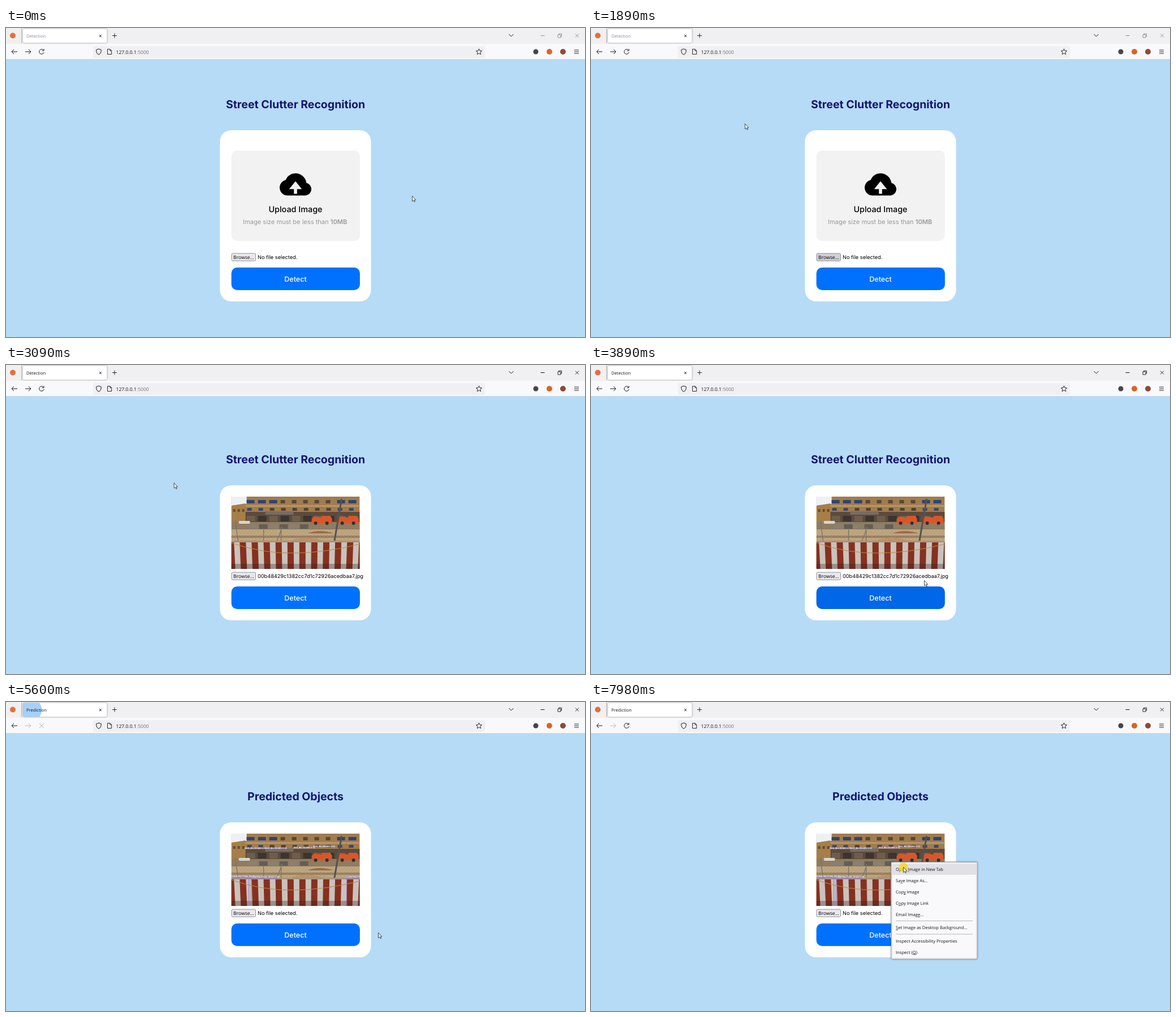
An HTML page with a canvas for the animation above (8000 ms loop, 1024 px wide and 547 px high).

```html
<!DOCTYPE html>
<html lang="en">
<head>
<meta charset="utf-8">
<title>Detection</title>
<style>
html, body { margin: 0; height: 100%; overflow: hidden; }
canvas { display: block; width: 100vw; height: 100vh; }
</style>
</head>
<body>
<canvas id="stage"></canvas>
<script>
const W = 1024, H = 547, LOOP = 8000;
const UI = '"Open Sans", "Noto Sans", "DejaVu Sans", sans-serif';
const PAGE = 'Inter, "Open Sans", sans-serif';
const FILE = '00b48429c1382cc7d1c72926acedbaa7';
const INK = '#15141a', GREY = '#8a8a92';
const canvas = document.getElementById('stage');
const ctx = canvas.getContext('2d');
const dpr = window.devicePixelRatio || 1;
canvas.width = W * dpr;
canvas.height = H * dpr;

// Drawing helpers
function text(s, x, y, { size = 7.6, color = INK, font = UI, weight = 400, align = 'left' } = {}) {
  ctx.font = `${weight} ${size}px ${font}`;
  ctx.fillStyle = color;
  ctx.textAlign = align;
  ctx.fillText(s, x, y + size * 0.36);
  return ctx.measureText(s).width;
}
function box(x, y, w, h, fill, stroke, r = 0, lineWidth = 1) {
  ctx.beginPath();
  ctx.roundRect(x, y, w, h, r);
  if (fill) { ctx.fillStyle = fill; ctx.fill(); }
  if (stroke) { ctx.strokeStyle = stroke; ctx.lineWidth = lineWidth; ctx.stroke(); }
}
function dot(x, y, r, fill) {
  ctx.beginPath();
  ctx.arc(x, y, r, 0, 7);
  ctx.fillStyle = fill;
  ctx.fill();
}
function path(d, x, y, stroke, fill, lineWidth = 1) {
  const shape = new Path2D(d);
  ctx.save();
  ctx.translate(x, y);
  if (fill) { ctx.fillStyle = fill; ctx.fill(shape); }
  if (stroke) { ctx.strokeStyle = stroke; ctx.lineWidth = lineWidth; ctx.stroke(shape); }
  ctx.restore();
}
function shadowed(blur, color, draw) {
  ctx.save();
  ctx.shadowBlur = blur * dpr;
  ctx.shadowColor = color;
  draw();
  ctx.restore();
}
function clipped(x, y, w, h, draw) {
  ctx.save();
  ctx.beginPath();
  ctx.rect(x, y, w, h);
  ctx.clip();
  draw();
  ctx.restore();
}
const during = (t, from, to) => t >= from && t < to;
const progress = (t, from, to) => Math.min(1, Math.max(0, (t - from) / (to - from)));

const CROSS = 'M-3-3L3 3M3-3L-3 3';
const DOWN = 'M-3-1.5L0 1.5L3-1.5';
const RIGHT = 'M-1.3-2.3L1.2 0L-1.3 2.3';

// Pointer track: time, x, y
const TRACK = [
  [380, 718, 297], [760, 570, 348], [1150, 414, 403], [1290, 414, 403], [1690, 347, 197],
  [2030, 220, 150], [2400, 176, 139], [2960, 176, 139], [3420, 600, 383], [3700, 600, 383],
  [3890, 589, 381], [4130, 575, 398], [4400, 561, 412], [4990, 561, 412], [5320, 652, 410],
  [5450, 658, 408], [5750, 658, 408], [6130, 599, 336], [6370, 529, 281], [7500, 529, 281], [7950, 552, 292]
];
const CLICKS = [[1180, 1300], [2540, 2610], [2680, 2750], [4570, 4710], [7100, 7240], [7960, 8000]];

function pointerAt(t) {
  const i = TRACK.findIndex(k => k[0] > t);
  if (i === 0) return TRACK[0].slice(1);
  if (i < 0) return TRACK.at(-1).slice(1);
  const [t0, x0, y0] = TRACK[i - 1], [t1, x1, y1] = TRACK[i];
  const p = progress(t, t0, t1);
  return [x0 + (x1 - x0) * p, y0 + (y1 - y0) * p];
}

function drawPointer(t) {
  const [x, y] = pointerAt(t);
  if (CLICKS.some(([a, b]) => during(t, a, b))) dot(x + 0.5, y + 0.8, 8.3, 'rgba(250,214,40,.85)');
  if (during(t, 4080, 5060))
    path('M0 1q1-2 2 0v4l4 1q1.6.5 1.2 2L6 12H1L-2.5 8q0-1.5 1.5-.7L0 8z', x, y, '#111', '#fff', 0.8);
  else
    path('M0 0V9.4L2.2 7.5L3.7 10.6L5 10L3.7 7H6.3Z', x + 0.5, y + 0.3, '#222', '#fff', 0.8);
}

function drawBrowser(t) {
  const predicted = t >= 5460;
  const loading = during(t, 4640, 5460);
  const active = during(t, 70, 1420) || t >= 2960;
  const tone = active ? INK : GREY;

  box(0, 0, W, 28, '#f0f0f2');
  box(0, 28, W, 27, '#f9f9fb');
  dot(12, 13.5, 5, '#e0703c');
  path('M0 0V27', 27.5, 0, '#b5b5bd');
  shadowed(3, 'rgba(0,0,0,.45)', () => box(30, 1.5, 148.5, 24.5, '#fff', null, 2.5));
  const burst = progress(t, 5510, 5930);
  if (burst > 0 && burst < 1) clipped(30, 1.5, 148, 24.5, () => {
    ctx.globalAlpha = 1 - burst * 0.5;
    dot(44, 14, 5 + burst * 66, '#9bcbfb');
  });
  if (loading) dot(40.5 + 4.5 * Math.sin((t - 4870) / 95), 14, 1.2, INK);
  text(predicted ? 'Prediction' : 'Detection', loading ? 50 : 36, 14, { color: tone });
  path('M-2-2L2 2M2-2L-2 2', 167, 14, INK, null, 0.9);
  path('M-4 0H4M0-4V4', 192, 13.5, INK, null, 0.9);
  path('M-4-2L0 2L4-2', 893.5, 13, INK);
  path('M-3.5 0H3.5', 949, 13.5, tone);
  path('M-3-1H2V4H-3ZM-1.3-1V-2.8H3.6V2H2', 979, 13, tone, null, 0.9);
  path(CROSS, 1010, 13.5, tone, null, 0.9);

  path('M5 0H-4.5M-1-4L-5 0L-1 4', 15, 42, INK);
  path('M-5 0H4.5M1-4L5 0L1 4', 39, 42, predicted ? '#b8b8be' : INK);
  if (during(t, 4640, 6230)) path('M-4-4L4 4M4-4L-4 4', 63, 42, predicted ? '#b0b0b6' : INK);
  else path('M4.2 1A4.3 4.3 0 1 1 3-3.2M4-5V-1.8H.8', 63, 42, INK);
  box(154, 32, 693, 21, '#f0f0f4', null, 2);
  path('M0-5L4.3-3.4C4.5 1 3 4 0 5.2C-3 4-4.5 1-4.3-3.4Z', 164, 42, INK);
  path('M-3.5-4.5H1L3.7-1.8V4.5H-3.5ZM1-4.5V-1.8H3.7', 183, 42, INK, null, 0.9);
  const hostWidth = text('127.0.0.1', 194.5, 42.5, { size: 8.6 });
  text(':5000', 194.5 + hostWidth, 42.5, { size: 8.6, color: '#75757d' });
  ctx.beginPath();
  for (let i = 0; i < 10; i++) {
    const a = i * Math.PI / 5 - Math.PI / 2, r = i % 2 ? 2.5 : 5.4;
    ctx.lineTo(836.5 + r * Math.cos(a), 42.3 + r * Math.sin(a));
  }
  ctx.closePath();
  ctx.strokeStyle = INK;
  ctx.lineWidth = 0.9;
  ctx.stroke();
  dot(937, 42, 4.5, '#45444c');
  dot(961, 42, 5, '#d9642b');
  dot(985, 42, 5, '#8d4b38');
  path('M-4-3H4M-4 0H4M-4 3H4', 1009, 42, INK, null, 0.9);
}

// Street scene in a 227 by 128 space
function drawPhoto(x, y, scale, labelled) {
  ctx.save();
  ctx.translate(x, y);
  ctx.scale(scale, scale);
  clipped(0, 0, 227, 128, () => {
    box(0, 0, 227, 128, '#a07c50');
    path('M0 0H27V13L0 16Z', 0, 0, null, '#edf0f4');
    path('M0 16L25 12V46H0Z', 0, 0, null, '#a67f48');
    box(25, 15, 202, 3, '#bb9564');
    box(25, 27, 202, 18, '#5b4b3c');
    for (let i = 0; i < 10; i++) {
      const blue = i < 3 || i > 7;
      box(27 + i * 20, 6, blue ? 14 : 8, 6, blue ? '#2f4470' : '#594734');
      box(28 + i * 20, 20, 8, 5, i < 2 || i > 7 ? '#37486a' : '#514030');
      box(27 + i * 20, 34, 15, 10, i % 2 ? '#3c342e' : '#6e5d4b');
    }
    for (let i = 0; i < 3; i++) box(3 + i * 8, 22, 4, 5, '#664d30');
    box(60, 26, 50, 6, '#756d64');
    box(0, 45, 227, 14, '#8f7c62');
    box(13, 43, 20, 5, '#d8d5ce', null, 2);
    for (const left of [142, 189]) {
      path('M0 6L4 1L18 3V0H33L36 5V13H0Z', left, 34, null, '#d9562b');
      dot(left + 7, 47, 3, '#30302f');
      dot(left + 27, 47, 3, '#30302f');
    }
    for (let i = 0; i < 6; i++) box(31 + i * 18, 49, 15, 8, i % 2 ? '#625e55' : '#89806f');
    box(0, 58, 227, 22, '#c0a780');
    box(0, 69, 227, 4, '#9a8263');
    path('M105 78Q132 67 162 78Z', 0, 0, null, '#bd956c');
    path('M135 65Q155 57 181 65Z', 0, 0, null, '#a06a48');
    for (let i = -20; i < 227; i += 6)
      path('M0 80L20 56M0 56L20 80', i, 0, 'rgba(105,95,80,.28)', null, 0.5);
    path('M195 4L182 80', 0, 0, '#555350', null, 3);
    path('M7 42L12 80M90 54L80 80M88 54V80M57 58V80', 0, 0, '#77736a', null, 1.3);
    box(0, 80, 227, 48, '#c9c2bc');
    for (let i = 0; i < 12; i++) {
      const lean = (i - 6) * 0.4;
      path(`M0 0H11L${11 - lean} 47H${-lean}Z`, -4 + i * 20.7 + lean, 81, null, '#87301f');
    }
    box(0, 78, 227, 3, '#a8937c');
    box(0, 119, 227, 9, 'rgba(45,28,24,.3)');
    path('M0 82Q55 101 112 100T227 84', 0, 0, '#b88c42', null, 1);
    if (labelled) {
      const label = (s, lx, ly, w) => {
        box(lx, ly - 2, w, 4, 'rgba(116,104,165,.55)');
        text(s, lx, ly, { size: 3.6, color: '#fff', font: PAGE, weight: 700 });
      };
      label('BAD_BILLBOARD 0.51', 24, 26, 38);
      label('BAD_BILLBOARD 0.53', 60, 26, 38);
      label('BAD_BILLBOARD 0.54', 110, 24.5, 36);
      label('BAD_BILLBOARD 0.62', 145, 23, 37);
      label('CONSTRUCTION_ROAD', 0, 76, 38);
      label('CONSTRUCTION_ROAD 0.65', 34, 77, 48);
      label('CONSTRUCTION', 203, 77, 24);
      path('M0 79H35V128M31 128V79H82M204 128V79H227', 0, 0, '#9877d2', null, 0.9);
    }
  });
  ctx.restore();
}

function mixButton(p) {
  return `rgb(0,${Math.round(113 - 21 * p)},${Math.round(255 - 46 * p)})`;
}

function drawPage(t) {
  const preview = t >= 3030, predicted = t >= 5460;
  const shift = preview ? 32 : 0;
  const middle = { font: PAGE, align: 'center' };

  box(0, 55, W, H - 55, '#b5dbf6');
  text(predicted ? 'Predicted Objects' : 'Street Clutter Recognition', 512, 135 + shift,
    { ...middle, size: 19.5, weight: 700, color: '#14146e' });
  box(378.3, 181 + shift, 267.3, 303 - 2 * shift, '#fff', null, 20);

  if (preview) {
    drawPhoto(398.6, 233, 1, predicted);
  } else {
    box(398.6, 217, 227.3, 160, '#f2f2f2', null, 10);
    ctx.save();
    ctx.translate(478.4, 246);
    ctx.scale(2.8, 2.8);
    path('M18.9 10.1C18.5 6.7 15.6 4 12 4C9.2 4 6.9 5.6 5.8 8.2C3.6 8.8 2 10.8 2 13C2 15.8 4.2 18 7 18H18C20.2 18 22 16.2 22 14C22 12.2 20.7 10.6 18.9 10.1ZM13 14V17H11V14H8L12 9L16 14Z', 0, 0, null, '#000');
    ctx.restore();
    text('Upload Image', 512, 321, { ...middle, size: 14.4, weight: 500, color: '#000' });
    const note = { font: PAGE, size: 11.1, color: '#999' };
    const noteWidth = text('Image size must be less than ', 419, 343, note);
    text('10MB', 419 + noteWidth, 343, { ...note, weight: 600 });
  }

  const pressed = during(t, 1180, 1280), hovered = during(t, 1080, 2960);
  box(399, 399 - shift, 42.5, 13.3, pressed ? '#b1b1b9' : hovered ? '#d0d0d7' : '#e9e9ed', '#8f8f9d', 2);
  text('Browse...', 420.3, 406 - shift, { size: 8.6, align: 'center', color: '#000' });
  text(preview && !predicted ? FILE + '.jpg' : 'No file selected.', 445, 406 - shift,
    { size: 9.2, font: PAGE, color: '#000' });
  const hover = progress(t, 3750, 4050) - progress(t, 5080, 5380);
  box(398.6, 424 - shift, 227.3, 40, mixButton(hover), null, 10);
  text('Detect', 512, 444 - shift, { ...middle, size: 12.5, weight: 500, color: '#fff' });

  if (during(t, 4700, 5530)) {
    box(-1, 536.5, 36.5, 12, '#f9f9fb', '#c6c6cc', 1);
    text('127.0.0.1', 2, 543, { color: '#444' });
  }
}

function folder(x, y) {
  box(x - 3, y - 4, 6, 8, '#f6ca55');
  box(x - 3, y - 3, 4, 7, '#ffe08a');
}

function drawDialog(t) {
  if (!during(t, 2060, 2890)) return;
  const selected = t >= 2540, hovered = t >= 2330;
  ctx.save();
  ctx.globalAlpha = t < 2150 ? 0.6 : 1;
  shadowed(t < 2150 ? 0 : 13, 'rgba(0,0,0,.5)', () => box(3.5, 14.5, 504, 316, '#fff', '#75777a'));
  dot(13.5, 25, 4.8, '#e0703c');
  text('File Upload', 22, 25);
  path(CROSS, 496, 25, INK);

  path('M4 0H-4M-1-3L-4 0L-1 3', 17, 48, '#d0d0d0');
  path('M-4 0H4M1-3L4 0L1 3', 40, 48, '#d0d0d0');
  path('M-1.5-.7L0 .7L1.5-.7', 53, 48, '#c0c0c0');
  path('M0 4V-4M-3-1L0-4L3-1', 67, 48, '#555');
  box(75.5, 38.5, 283, 20, '#fff', '#dadada');
  path('M0 0V20', 336.5, 38.5, '#dadada');
  folder(82, 48);
  for (const x of [94, 133, 178]) path(RIGHT, x, 48, '#555');
  text('This PC', 101, 48);
  text('Desktop', 140, 48);
  text('img', 184, 48);
  path(DOWN, 325, 48, '#555');
  path('M3 1A3.2 3.2 0 1 1 2-2.5M3-4V-1.5H.5', 348, 48, '#555');
  box(365.5, 38.5, 135, 20, '#fff', '#dadada');
  path('M-1 1L-4 4M4-1.5A2.5 2.5 0 1 1-1-1.5A2.5 2.5 0 1 1 4-1.5', 379, 48, '#777', null, 0.8);
  text('Search img', 393, 48, { color: '#6d6d6d' });

  box(4, 62, 503, 21, '#f5f6f7');
  text('Organize', 15, 72.5, { color: '#1e395b' });
  text('New folder', 74, 72.5, { color: '#1e395b' });
  path('M-2-1H2L0 1.3Z', 53, 72.5, null, INK);
  path('M-2-1H2L0 1.3Z', 445, 72.5, null, INK);
  box(426, 68.5, 9, 7, '#a9cbe5', '#8096a6', 0, 0.6);
  box(426, 73, 9, 2.5, '#446f91');
  box(462.5, 68.5, 9, 7.5, '#fff', '#327bb8', 0, 0.8);
  box(467.5, 69, 4, 7, '#66b3ea');
  dot(491.5, 72.5, 5.5, '#0068b8');
  text('?', 491.5, 72.5, { color: '#fff', weight: 700, align: 'center' });

  clipped(4, 83, 93, 194, () => {
    box(4, 264, 93, 14, '#d9d9d9');
    const places = ['Desktop', 'Downloads', 'Documents', 'Pictures', 'G:\\',
      'Final_submission', 'PDF_مرتب', 'test', 'street-clutter-m'];
    places.forEach((name, i) => {
      const y = 91 + i * 16;
      if (i === 1) path('M-1.5-4H1.5V0H4L0 4L-4 0H-1.5Z', 30, y, null, '#2785d8');
      else if (i > 4) folder(30, y);
      else box(26, y - 3, 8.5, 6.5, ['#1b8ce3', '', '#a9bdcc', '#8dbbd8', '#737b80'][i], '#54768d', 0, 0.5);
      text(name, 38.5, y);
      if (i < 5) path('M-3 3L-1 1M-2-.5L1.5 2.5M-1 0L1-3L3.5-1L1 1.5', 91, y, '#777', null, 0.9);
    });
    box(22, 237, 8, 6, '#46a7e4', '#617d8d', 0, 0.6);
    text('This PC', 33, 240.5);
    path('M-4-2.5L0-4.5L4-2.5V2.5L0 4.5L-4 2.5Z', 30, 257, null, '#2d9bd3');
    path('M-4-2.5L0-1V4.5L-4 2.5Z', 30, 257, null, '#176c9c');
    text('3D Objects', 38.5, 257);
    box(26, 270, 9, 6.5, '#1b8ce3', '#165c91', 0, 0.5);
    text('Desktop', 38.5, 273);
  });
  box(97, 83, 10, 194, '#f0f0f0');
  box(97, 104, 10, 91, '#cdcdcd');
  path('M-2.5 1.3L0-1.3L2.5 1.3', 102, 89, '#444');
  path('M-2.5-1.3L0 1.3L2.5-1.3', 102, 271, '#444');

  if (selected || hovered)
    box(120.5, 87.5, 69, 99, selected ? '#cce8ff' : '#e5f3ff', selected ? '#99d1ff' : null);
  shadowed(2, 'rgba(0,0,0,.6)', () => box(125, 116.5, 58, 33, '#a07c50'));
  drawPhoto(125, 116.5, 58 / 227, false);
  [FILE.slice(0, 14), FILE.slice(14, 28), FILE.slice(28)].forEach((s, i) =>
    text(s, 155, 158.5 + i * 10.8, { align: 'center' }));

  box(4, 277, 503, 53, '#f0f0f0');
  text('File name:', 119, 293, { align: 'right' });
  box(122.5, 286.5, 240, 14, '#fff', '#0078d7');
  if (selected) text(FILE, 124, 293);
  path(DOWN, 357, 293, '#555', null, 0.8);
  box(371.5, 286.5, 124, 14, '#e1e1e1', '#adadad');
  text('All Files', 373, 293);
  path(DOWN, 490, 293, '#555', null, 0.8);
  box(372, 306, 56.5, 15, '#e1e1e1', '#0078d7', 0, 1.4);
  text('Open', 400, 313.5, { align: 'center' });
  box(438.5, 305.5, 57, 16, '#e1e1e1', '#adadad');
  text('Cancel', 467, 313.5, { align: 'center' });
  path('M0 6L6 0M3 6L6 3', 500, 323, '#b5b5b5', null, 0.9);
  ctx.restore();
}

// Menu rows: centre line, caption, index of the underlined letter
const MENU = [
  [296.5, 'Open Image in New Tab', 5], [316.5, 'Save Image As...', 2], [336.5, 'Copy Image', 3],
  [356.5, 'Copy Image Link', 1], [376.5, 'Email Image...', 10],
  [399.5, 'Set Image as Desktop Background...', 0],
  [423, 'Inspect Accessibility Properties', -1], [443, 'Inspect (Q)', 9]
];

function drawMenu(t) {
  if (t < 7240) return;
  shadowed(3, 'rgba(0,0,0,.4)', () => box(531, 283.5, 152, 171.5, '#f9f9fb', '#a9a9b0', 1, 0.8));
  if (t >= 7640) box(531.5, 286.5, 151, 19.5, '#e0e0e6');
  for (const [y, caption, key] of MENU) {
    text(caption, 539, y);
    if (key < 0) continue;
    const start = ctx.measureText(caption.slice(0, key)).width;
    const width = ctx.measureText(caption[key]).width;
    box(539 + start, y + 3.6, width, 0.7, INK);
  }
  path('M0 0H136M0 23.5H136', 539, 387.5, '#a5a5ab', null, 0.8);
}

function frame(now) {
  const t = now % LOOP;
  ctx.setTransform(dpr, 0, 0, dpr, 0, 0);
  ctx.textRendering = 'geometricPrecision';
  drawBrowser(t);
  drawPage(t);
  drawDialog(t);
  drawMenu(t);
  drawPointer(t);
  requestAnimationFrame(frame);
}
requestAnimationFrame(frame);
</script>
</body>
</html>
```
